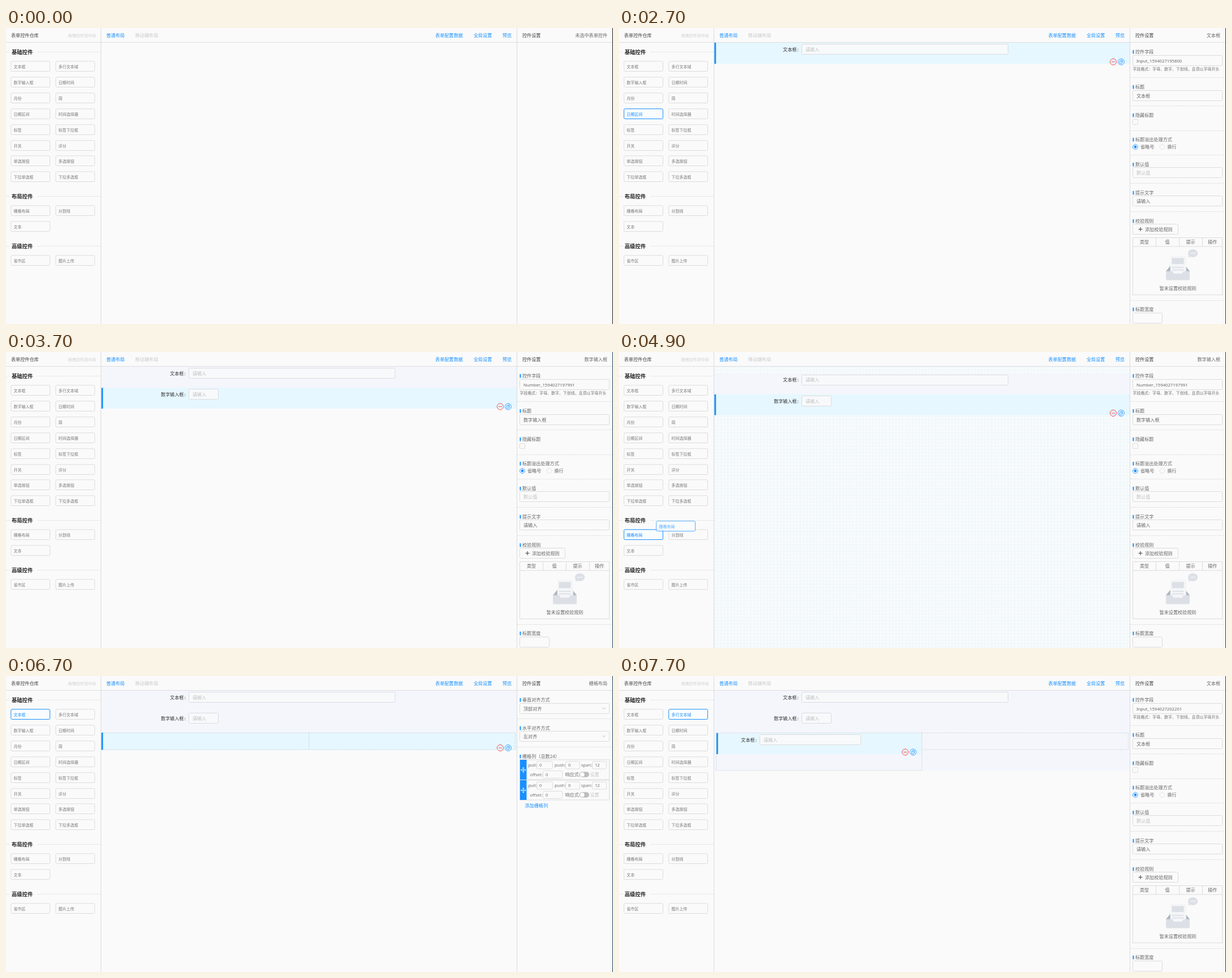
An HTML page for the animation above (8000 ms loop, 1071 px wide and 523 px high).

```html
<!DOCTYPE html>
<html lang="zh-CN">
<head>
<meta charset="utf-8">
<title>表单设计器</title>
<style>
html, body { margin: 0; width: 100%; height: 100%; overflow: hidden; background: #fafafa; }
svg { display: block; width: 1071px; height: 523px; }
text { font-family: "Noto Sans CJK SC", "Noto Sans CJK", "Noto Sans CJK JP", sans-serif; white-space: pre; }
text.latin { font-family: "Noto Sans", "Open Sans", sans-serif; }
</style>
</head>
<body>
<svg id="stage" viewBox="0 0 1071 523" xmlns="http://www.w3.org/2000/svg">
  <defs>
    <pattern id="grid" x="168" y="26" width="5.82" height="5.82" patternUnits="userSpaceOnUse">
      <rect width="5.82" height="5.82" fill="#f8fbfc"/>
      <path d="M0 .5H5.82M.5 0V5.82" stroke="#eef7fa" fill="none"/>
    </pattern>
  </defs>
  <g id="center"></g>
  <g id="chrome"></g>
  <g id="panel"></g>
  <g id="hover"></g>
  <g id="drag"></g>
</svg>
<script>
const LOOP = 8000, BLUE = '#1890ff', RED = '#f5222d', BG = '#fafafa', BORDER = '#dcdcdc';
const $ = id => document.getElementById(id);

// ---- drawing helpers (text y is the vertical middle) ----
const text = (x, y, s, size = 8.12, color = '#666', extra = '') =>
  `<text x="${x}" y="${y + size * .38}" font-size="${size}" fill="${color}" ${extra}>${s}</text>`;
const latin = (x, y, s, color = '#666', size = 7.7) => text(x, y, s, size, color, 'class="latin"');
const mid = (x, y, s, size, color) => text(x, y, s, size, color, 'text-anchor="middle"');
const end = (x, y, s, size, color) => text(x, y, s, size, color, 'text-anchor="end"');
const fill = (x, y, w, h, color) => `<rect x="${x}" y="${y}" width="${w}" height="${h}" fill="${color}"/>`;
const box = (x, y, w, h, stroke = BORDER, bg = BG, r = 2) =>
  `<rect x="${x + .5}" y="${y + .5}" width="${w - 1}" height="${h - 1}" rx="${r}" fill="${bg}" stroke="${stroke}"/>`;
const path = (d, stroke, width = 1, extra = '') =>
  `<path d="${d}" fill="none" stroke="${stroke}" stroke-width="${width}" ${extra}/>`;
const dashed = (x, y, w, h) =>
  `<rect x="${x + .5}" y="${y + .5}" width="${w - 1}" height="${h - 1}" fill="none" stroke="#cfd4da" stroke-dasharray="2 1.5"/>`;
const ring = (x, y, r, stroke, bg = 'none') =>
  `<circle cx="${x}" cy="${y}" r="${r}" fill="${bg}" stroke="${stroke}" stroke-width=".8"/>`;
const dot = (x, y, r, color) => `<circle cx="${x}" cy="${y}" r="${r}" fill="${color}"/>`;

// ---- sidebar ----
const sections = [
  [42, '基础控件', ['文本框', '多行文本域', '数字输入框', '日期时间', '月份', '周', '日期区间', '时间选择器',
    '标签', '标签下拉框', '开关', '评分', '单选按钮', '多选按钮', '下拉单选框', '下拉多选框']],
  [297, '布局控件', ['栅格布局', '分割线', '文本']],
  [385, '高级控件', ['省市区', '图片上传']]
];
const spots = {};
const chip = (name, x, y, active) =>
  box(x + .3, y + .3, 69.7, 18.7, active ? BLUE : BORDER, active ? '#f9fcfe' : BG) +
  text(x + 5.5, y + 10.3, name, 7, active ? BLUE : '#777');

function chrome() {
  let s = fill(0, 25, 1071, 1, '#dedede') + fill(167, 0, 1, 523, '#dcdcdc') + fill(901, 0, 1, 523, '#dcdcdc');
  s += text(9, 13, '表单控件仓库', 8.12, '#444') + end(158.5, 13, '拖拽控件到中间', 7, '#cfcfcf');
  s += text(177, 13, '普通布局', 8.12, BLUE) + text(228, 13, '移动端布局', 8.12, '#c8c8c8');
  s += text(757.5, 13, '表单配置数据', 8.12, BLUE) + text(825, 13, '全局设置', 8.12, BLUE) + text(876, 13, '预览', 8.12, BLUE);
  s += text(911, 13, '控件设置', 8.12, '#444');
  for (const [lineY, title, names] of sections) {
    s += fill(0, lineY, 7, 1, '#e8e8e8') + fill(55, lineY, 112, 1, '#e8e8e8');
    s += text(10, lineY, title, 9.3, '#222', 'font-weight="600"');
    names.forEach((name, i) => {
      const at = spots[name] = [i % 2 ? 87 : 8, Math.round(lineY + 16 + (i >> 1) * 27.9)];
      s += chip(name, ...at);
    });
  }
  return s;
}

// ---- settings panel ----
const label = (y, s) => fill(906.5, y - 3, 2, 6.5, BLUE) + text(911, y, s);
const rule = y => path(`M902 ${y + .5}H1070`, '#dedede', 1, 'stroke-dasharray="2 1"');
const field = (y, s, color) =>
  box(906, y, 159, 19) + (/^\w/.test(s) ? latin(913, y + 9.8, s, color) : text(913, y + 9.8, s, 8.12, color));

function emptyBox() {
  let s = '<ellipse cx="1012.5" cy="398" rx="8.700" ry="7" fill="#dce0e6"/><path d="M1005 401v4.500l5-2z" fill="#dce0e6"/>';
  for (const x of [1009, 1012.5, 1016]) s += dot(x, 398, 1, '#fff');
  s += '<path d="M965 429.700l9.300-11.400q.7-.9 1.700-.9h20q1 0 1.700 .9l9.300 11.400v6h-42z" fill="#aeb8c2"/>';
  s += fill(972.8, 402.7, 27.9, 36, '#f5f5f7') + fill(975.5, 406.5, 21, 10.6, '#dce0e6');
  s += path('M976 422.800H996M976 427.400H996', '#dce0e6', 1.75);
  s += '<path d="M965 429.700h10.200q2 0 2 2.100t2 2.100h13.600q2 0 2-2.100t2-2.100h10.200v13q0 2.700-2.700 2.700h-36.600q-2.700 0-2.700-2.700z" fill="#dce0e6"/>';
  return s;
}

function fieldPanel(id, title) {
  let s = label(42, '控件字段') + field(48, id) +
    text(906.5, 72.5, '字段格式：字母、数字、下划线，且须以字母开头', 6.95, '#707070');
  s += [87, 137, 181, 224, 274, 324, 481].map(rule).join('');
  s += label(104, '标题') + field(110, title);
  s += label(154, '隐藏标题') + box(906, 161, 10, 10, BORDER, BG, 1);
  s += label(197, '标题溢出处理方式') + ring(911, 210, 4.4, BLUE, BG) + dot(911, 210, 2.4, BLUE) + text(920, 210, '省略号');
  s += ring(958.5, 210, 4.4, BORDER, BG) + text(967.5, 210, '换行');
  s += label(241, '默认值') + field(246, '默认值', '#bfbfbf');
  s += label(291, '提示文字') + field(296, '请输入');
  s += label(341, '校验规则') + box(906, 346, 81, 19) + path('M916.5 355.500H923.500M920 352V359', '#444', 1.1) + text(928, 355.8, '添加校验规则');
  s += box(906, 370, 159, 102, BORDER, BG, 0) + path('M907 386H1065M947.5 370V386M988.500 370V386M1029.500 370V386', BORDER);
  ['类型', '值', '提示', '操作'].forEach((name, i) => s += mid([927, 967.5, 1008.5, 1047][i], 378.3, name));
  s += emptyBox() + mid(986, 460, '暂未设置校验规则');
  return s + label(497, '标题宽度') + box(906, 503, 53, 19);
}

function gridPanel() {
  const select = (y, s) => field(y, s) + path(`M1052 ${y + 8}l2.700 2.700l2.700-2.700`, '#bbb');
  const pair = (x, y, name, bx, w, value) => latin(x, y, name, '#707070', 7.5) + box(bx, y - 7, w, 14) + latin(bx + 5, y, value, '#707070', 7.5);
  let s = label(42, '垂直对齐方式') + select(48, '顶部对齐') + rule(75);
  s += label(92, '水平对齐方式') + select(97, '左对齐') + rule(125) + label(142, '栅格列（总数24）');
  for (const y of [148, 184]) {
    s += box(906, y - .5, 159, 36, BORDER, BG, 0) + fill(907, y, 11.5, 35, BLUE);
    s += path(`M908.5 ${y + 18}h8.500M912.750 ${y + 13.7}v8.600M910 ${y + 16.5}l-1.500 1.500l1.500 1.500M915.500 ${y + 16.5}l1.500 1.500l-1.500 1.500M911.250 ${y + 15.2}l1.500-1.500l1.500 1.500M911.250 ${y + 20.8}l1.500 1.500l1.500-1.500`, '#fff', .9);
    s += pair(921.5, y + 9.5, 'pull:', 936, 29, '0') + pair(968, y + 9.5, 'push:', 987, 26, '0') + pair(1015, y + 9.5, 'span:', 1034, 26, '12');
    s += pair(924.5, y + 26, 'offset:', 947, 35, '0') + text(986.5, y + 26, '响应式:', 8.12, '#707070');
    s += `<rect x="1012" y="${y + 21.3}" width="17" height="9.400" rx="4.700" fill="#bdbdbd"/>` + dot(1016.8, y + 26, 3.8, '#fff');
    s += text(1030.5, y + 26, '设置', 8.12, '#c8c8c8');
  }
  return s + text(915.5, 229, '添加栅格列', 8.12, BLUE);
}

const panels = {
  none: ['未选中表单控件', () => ''],
  input: ['文本框', () => fieldPanel('Input_1594027195800', '文本框')],
  number: ['数字输入框', () => fieldPanel('Number_1594027197991', '数字输入框')],
  grid: ['栅格布局', gridPanel],
  nested: ['文本框', () => fieldPanel('Input_1594027202201', '文本框')]
};

// ---- canvas in the middle ----
const tools = (x, y) =>
  ring(x, y, 5.5, RED) + path(`M${x - 3} ${y}h6`, RED, .8) +
  ring(x + 14, y, 5.5, BLUE) +
  path(`M${x + 12.8} ${y - 2.8}h3.700v4.600M${x + 11.5} ${y - 1.6}h3.400v4.700h-3.400z`, BLUE, .7);

function row(x, y, w, h, name, bx, bw, active) {
  let s = fill(x, y, w, h, active ? '#e6f7ff' : '#f4f6fc');
  if (name) s += end(bx - 8.3, y + 11.8, name, 8.12, '#333') + text(bx - 7.2, y + 11.8, ':', 8.12, '#333') +
    box(bx, Math.round(y + 2), bw, 19, BORDER, '#f7f9fb') + text(bx + 7, y + 11.8, '请输入', 8.12, '#bfbfbf');
  if (active) s += fill(x + .3, y, 2.9, h, BLUE) + tools(x + w - 29, y + h - 3.5);
  return s;
}

function center({ rows, sel, ghost, pad }) {
  let s = fill(168, 26, 733, 497, ghost ? 'url(#grid)' : BG);
  const y = 26 + (ghost ? pad : 0);
  if (rows > 0) s += row(168, y, 733, 37.3, '文本框', 322, 365, sel === 'input');
  if (rows > 1) s += row(168, y + 37.3, 733, 36.7, '数字输入框', 322, 53, sel === 'number');
  if (rows > 2) {
    const top = y + 74, nested = rows > 3;
    s += row(168, top, 733, nested ? 67 : 30.5, '', 0, 0, sel === 'grid');
    if (nested) s += row(171.5, top + .7, 362.5, 37.3, '文本框', 248, 179, sel === 'nested');
    s += dashed(171, top, 364, nested ? 67.5 : 30.5) + dashed(534, top, 365, 30.5);
  }
  return s;
}

function drag({ ghost, hover, line }) {
  if (!ghost) return '';
  const bar = line ? fill(line[0], line[1], line[2], 3, BLUE) : '';
  return bar + `<g opacity=".72">${chip(hover, ...ghost, true)}</g>`;
}

// ---- timeline: each step changes part of the state ----
const drop = { ghost: null, line: null, hover: null };
const steps = [
  [0, { edge: '#141414', rows: 0, sel: 'none', pad: 0, ...drop }],
  [700, { edge: '#1d3c55' }],
  [1100, { hover: '文本框' }],
  [1400, { ghost: [244, 72], line: [168, 56, 592] }],
  [1500, { ghost: [275, 73], line: [168, 56, 700] }],
  [1600, { ghost: [278, 73], line: [168, 56, 733] }],
  [1700, { ...drop, rows: 1, sel: 'input' }],
  [2700, { hover: '日期区间' }],
  [2900, { hover: '月份' }],
  [3000, { hover: null }],
  [3100, { hover: '数字输入框' }],
  [3400, { ghost: [128, 104], pad: 11.5 }],
  [3500, { ghost: [244, 112], pad: 26, line: [168, 100, 560] }],
  [3600, { ghost: [250, 112], pad: 30, line: [168, 100, 720] }],
  [3700, { ...drop, rows: 2, sel: 'number' }],
  [3900, { hover: '开关' }],
  [4100, { hover: '单选按钮' }],
  [4200, { hover: '下拉单选框' }],
  [4500, { hover: '栅格布局' }],
  [4900, { ghost: [65, 298], pad: 11.5 }],
  [5000, { ghost: [150, 262], pad: 26 }],
  [5100, { ghost: [230, 236], pad: 30 }],
  [5200, { ghost: [283, 223], line: [168, 164, 500] }],
  [5300, { ghost: [296, 211], line: [168, 164, 692] }],
  [5400, { ghost: [297, 198], line: [168, 164, 733] }],
  [5600, { ...drop, rows: 3, sel: 'grid' }],
  [6100, { hover: '下拉多选框' }],
  [6200, { hover: '标签下拉框' }],
  [6300, { hover: '月份' }],
  [6400, { hover: null }],
  [6700, { hover: '文本框' }],
  [6900, { ghost: [190, 96], pad: 11.5 }],
  [7000, { ghost: [240, 116], pad: 26 }],
  [7100, { ghost: [262, 132], pad: 30, line: [171, 134, 290] }],
  [7200, { ghost: [268, 140], line: [171, 134, 363] }],
  [7500, { ...drop, rows: 4, sel: 'nested' }],
  [7700, { hover: '多行文本域' }]
];

function draw(count) {
  const state = Object.assign({}, ...steps.slice(0, count).map(step => step[1]));
  const [title, body] = panels[state.sel];
  $('center').innerHTML = center(state);
  $('panel').innerHTML = end(1061, 13, title) + body() + fill(1070, 0, 1, 523, state.edge);
  $('hover').innerHTML = state.hover ? chip(state.hover, ...spots[state.hover], true) : '';
  $('drag').innerHTML = drag(state);
}

let shown = 0;
const start = performance.now();
function tick() {
  const t = (performance.now() - start) % LOOP;
  const count = steps.filter(([at]) => at <= t).length;
  if (count !== shown) draw(shown = count);
  requestAnimationFrame(tick);
}
$('chrome').innerHTML = chrome();
tick();
</script>
</body>
</html>
```
